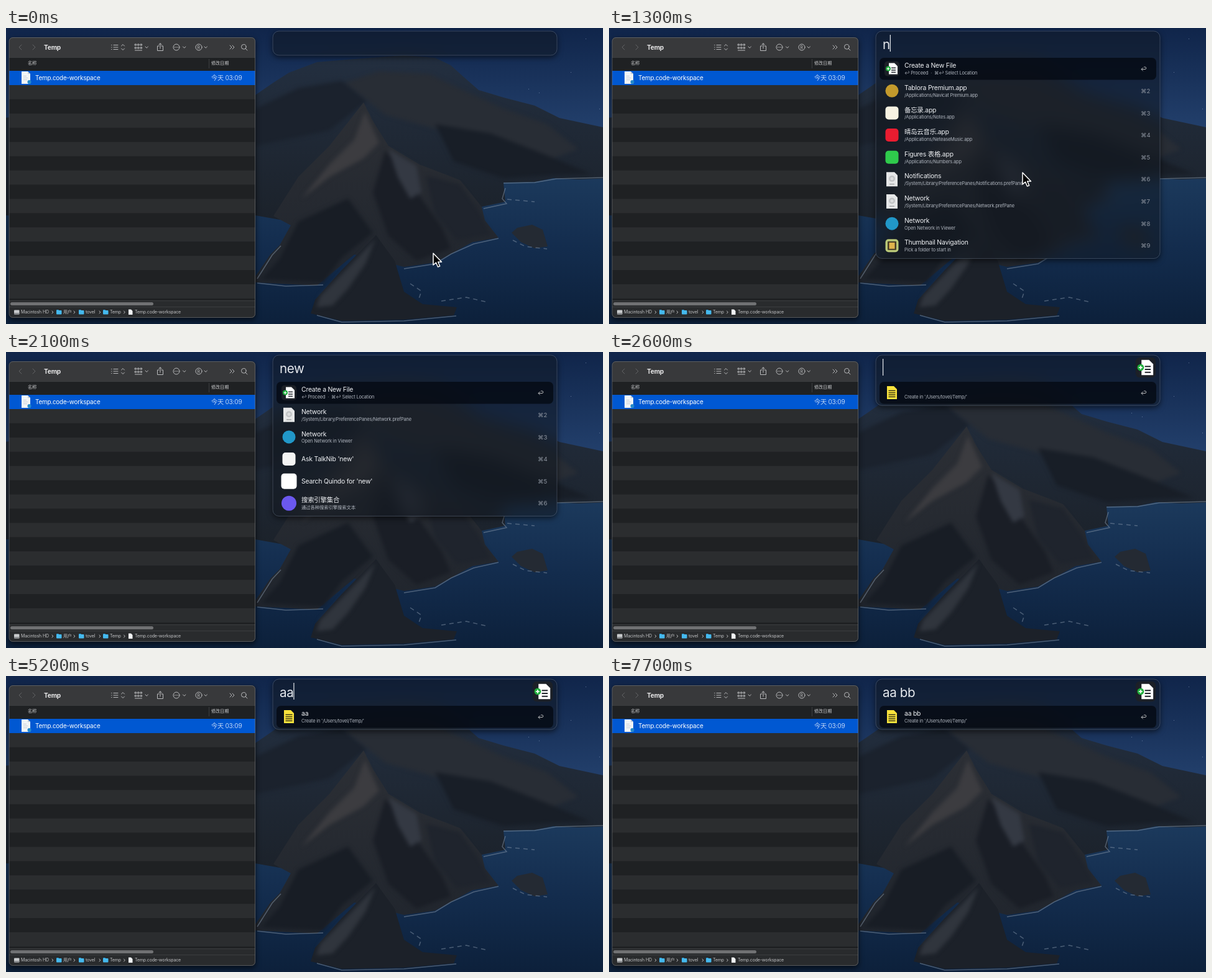
These frames come from a looping animation (960 by 477 pixels, 8000 ms). An HTML page:

```html
<!DOCTYPE html>
<html lang="zh">
<head>
<meta charset="utf-8">
<title>Create a New File</title>
<style>
  html, body { margin: 0; height: 100%; overflow: hidden; background: #0d1d38; }
  svg { display: block; width: 100vw; height: 100vh; }
  text { font-family: Inter, "Noto Sans CJK SC", "Noto Sans CJK", "DejaVu Sans", sans-serif; letter-spacing: -.02em; white-space: pre; }
  .line { fill: none; stroke: #b9babc; stroke-linecap: round; stroke-linejoin: round; }
  .soft { filter: blur(3px); }
  #finder { filter: drop-shadow(0 3px 5px #000a); }
  #panel { filter: drop-shadow(0 3px 5px #0009); }
</style>
</head>
<body>
<svg viewBox="0 0 960 477">
  <defs>
    <linearGradient id="sky" gradientUnits="userSpaceOnUse" x2="0" y2="160">
      <stop offset="0" stop-color="#10254a"/><stop offset="1" stop-color="#223f6b"/>
    </linearGradient>
    <linearGradient id="sea" x2="0" y2="1">
      <stop offset="0" stop-color="#1c3a5d"/><stop offset=".4" stop-color="#132c4d"/><stop offset="1" stop-color="#091a31"/>
    </linearGradient>
    <linearGradient id="hill" x2="0" y2="1">
      <stop offset="0" stop-color="#232f40"/><stop offset="1" stop-color="#1b2129"/>
    </linearGradient>
    <linearGradient id="crest" x2="0" y2="1">
      <stop offset="0" stop-color="#2c2f35"/><stop offset="1" stop-color="#20252d"/>
    </linearGradient>
    <clipPath id="panelClip"><rect id="panelShape" x="429" y="5" width="457" rx="10"/></clipPath>
    <clipPath id="finderClip"><rect x="5" y="15" width="396" height="452" rx="6"/></clipPath>
  </defs>

  <g id="wall">
    <path fill="url(#sky)" d="M-60-60H1020V250H-60Z"/>
    <path fill="url(#sea)" d="M-60 235H1020V540H-60Z"/>
    <path fill="#8fa5c4" opacity=".6" d="M857 104h1v1h-1zM908 71h1v1h-1zM932 17h1v1h-1zM840 98h1v1h-1zM954 130h1v1h-1z"/>
    <path fill="url(#hill)" d="M-60 150 401 108 430 88 455 72 500 55 560 50 640 44 690 48 715 60 735 78 760 100 800 112 850 125 890 145 960 160H1020V240L920 244 880 242 850 248 800 249 803 280 765 288 560 330 401 302H-60Z"/>
    <g class="soft">
      <path fill="#1b222d" d="M401 130 470 97 540 85 580 118 520 165 450 180 401 190Z"/>
      <path fill="#282d35" d="M545 88 600 70 680 74 735 100 800 130 870 155 920 195 880 210 800 200 700 165 610 140Z"/>
      <path fill="#181e27" d="M690 155 780 170 870 205 940 235 880 237 800 242 720 215Z"/>
    </g>
    <path fill="url(#crest)" d="M575 120 590 150 615 190 665 220 730 245 765 288 770 310 792 338 750 345 690 378 640 385 560 365 500 415 401 410 401 400 425 365 440 350 458 318 430 303 470 240 520 190Z"/>
    <g class="soft">
      <path fill="#3c3c40" d="M577 135 600 185 575 210 520 240 475 275 520 220 560 180Z"/>
      <path fill="#1a1e26" d="M610 197 650 250 700 320 715 355 660 375 615 335 590 265Z"/>
      <path fill="#343943" d="M615 195 660 222 668 265 650 275 630 240Z"/>
      <path fill="#1f242d" d="M675 238 730 252 758 292 780 333 725 342 690 300Z"/>
      <path fill="#181d25" d="M470 312 550 275 590 330 540 370 510 410 410 405 440 372Z"/>
    </g>
    <path fill="#1c2129" d="M595 334 625 375 640 425 670 445 725 450 720 463 640 470 540 472 490 460 497 438 540 390Z"/>
    <path class="soft" fill="#30353d" d="M594 340 578 380 550 420 525 447 499 450 505 432 548 388Z"/>
    <path fill="#242a33" d="M813 330 822 322 846 317 863 325 871 352 850 355 828 345Z"/>
    <g fill="none" stroke="#8797aa" stroke-width="1.5" opacity=".5">
      <path d="M800 250 850 249 885 243 960 241M803 258 798 275 805 283 768 291M792 339 752 348 716 364 690 380 640 388M500 463 540 474 640 472 724 464M404 404 428 366 442 351M404 411 450 416 510 414"/>
      <path stroke-dasharray="7 6" d="M815 342 835 352 870 356M700 440 740 434 775 442M650 412 668 424 664 436M806 276 850 280"/>
    </g>
  </g>

  <g id="finder">
    <g clip-path="url(#finderClip)">
      <path fill="#1f2123" d="M5 15H401V467H5Z"/>
      <path fill="#38393b" d="M5 15H401V47H5Z"/>
      <g id="stripes"></g>
      <path fill="#0058d2" d="M5 69H401V92H5Z"/>
      <path fill="#3c3e40" d="M5 47H401v1H5ZM326 50h1V65h-1ZM5 439H401v1H5ZM5 449H401v1H5Z"/>
      <path fill="#292b2d" d="M5 440H401V449H5ZM5 450H401V467H5Z"/>
      <rect x="7" y="442" width="230" height="5" rx="2.5" fill="#707173"/>
      <g class="line">
        <path stroke="#626365" d="M25 27 21 31 25 35M43 27 47 31 43 35"/>
        <path d="M173 27.5h7M173 31h7M173 34.5h7M169.5 27.5h.5M169.5 31h.5M169.5 34.5h.5M185.5 29 188 26.5 190.5 29M185.5 33 188 35.5 190.5 33"/>
        <path d="M207.5 26h2v2h-2zM212 26h2v2h-2zM216.5 26h2v2h-2zM207.5 31h2v2h-2zM212 31h2v2h-2zM216.5 31h2v2h-2zM207.5 36h11"/>
        <path d="M224 30l2.2 2.2L228.4 30M284.5 30l2.2 2.2L288.9 30M319 30l2.2 2.2L323.4 30"/>
        <path d="M246 29h-2.5v7.5h9V29H250M248 33V25M245.7 27 248 24.7 250.3 27"/>
        <path d="M360 28l3 3-3 3M364 28l3 3-3 3M385.3 33.3 388 36"/>
        <circle cx="274" cy="31" r="5"/><path stroke-width="1.5" d="M271.5 31h0M274 31h0M276.5 31h0"/>
        <circle cx="310" cy="31" r="5"/><circle cx="382.3" cy="30.3" r="3.8"/>
      </g>
      <path fill="#f2f4f6" d="M25 70h10l4 4V90H25Z"/>
      <path fill="#c5cdd6" d="M35 70v4h4ZM28 77h5v1h-5zM28 80h7v1h-7zM28 83h6v1h-6z"/>
      <circle cx="37.5" cy="87" r="3" fill="#2489ca"/>
      <g id="finderText"></g>
    </g>
    <rect x="5" y="15.5" width="395.5" height="451" rx="6" fill="none" stroke="#77797c" stroke-opacity=".6"/>
  </g>

  <g id="panel">
    <g clip-path="url(#panelClip)">
      <use href="#wall" style="filter:blur(14px)"/>
      <path fill="#10161f" fill-opacity=".5" d="M429 5H886V380H429Z"/>
    </g>
    <rect id="panelEdge" x="429" y="5" width="457" rx="10" fill="none" stroke="#8492a8" stroke-opacity=".35"/>
  </g>
  <g id="rows"></g>
  <text id="query" x="440" y="33.5" font-size="20.6" fill="#e6e9ee"></text>
  <rect id="caret" y="11" width="1.2" height="27" fill="#e6e9ee"/>
  <path id="mouse" d="M0 0V19L4.5 15 7.5 22 10.7 20.7 7.7 14H13.5Z" stroke="#fff" stroke-width="1.5" stroke-linejoin="round"/>
</svg>

<script>
const $ = id => document.getElementById(id);
const label = (x, y, text, size, fill, extra = '') =>
  `<text x="${x}" y="${y}" font-size="${size}" fill="${fill}" ${extra}>${text}</text>`;
const box = (x, y, w, h, fill, rx = 0) =>
  `<rect x="${x}" y="${y}" width="${w}" height="${h}" rx="${rx}" fill="${fill}"/>`;
const dot = (x, y, r, fill) => `<circle cx="${x}" cy="${y}" r="${r}" fill="${fill}"/>`;

// Finder window
const folder = x => box(x, 454, 4, 3, '#2f9fd8', 1) + box(x, 455, 8.5, 6.5, '#45b9ee', 1);
const pathText = (x, text) => label(x, 460.3, text, 7, '#c3c4c6');
const chevron = x => `<path class="line" d="M${x} 456l1.8 2-1.8 2"/>`;
for (let i = 0; i < 8; i++) $('stripes').innerHTML += box(5, 92 + i * 45.85, 396, 22.9, '#2b2d2f');
$('finderText').innerHTML =
  label(61, 34.6, 'Temp', 10.2, '#e8e8e9', 'font-weight="700"') +
  label(307.6, 33.6, 'R', 7, '#b9babc') +
  label(35, 59, '名称', 7.2, '#c9cacc') + label(330, 59, '修改日期', 7.2, '#c9cacc') +
  label(47, 83.5, 'Temp.code-workspace', 9.9, '#fff') +
  label(330, 83.5, '今天 03:09', 10.1, '#bfd5f6') +
  box(13, 454.5, 8.5, 7, '#c9cbcd', 1) + box(13, 459, 8.5, 2.5, '#8d9093', 1) +
  pathText(24, 'Macintosh HD') + folder(81) + pathText(92, '用户') + folder(117) +
  pathText(128, 'tovel') + folder(156) + pathText(167, 'Temp') +
  '<path fill="#f2f4f6" d="M197 453.5h4l2.5 2.5v6h-6.5Z"/>' + pathText(207, 'Temp.code-workspace') +
  [74, 109, 150, 189.5].map(chevron).join('');

// Row icons, drawn around the origin
const page = (w, h, fill) => `<path fill="${fill}" d="M${-w} ${-h}H${w - 5}L${w} ${5 - h}V${h}H${-w}Z"/>`;
const tile = fill => box(-10.5, -10.5, 21, 21, fill, 5);
const bars = (x, w, fill, ys) => ys.map(y => box(x, y, w, 1.5, fill)).join('');
const plusPage = box(-12, -12, 24, 24, '#1c2027', 5) +
  `<g transform="translate(2)">${page(7, 9, '#fff')}${bars(-3, 7, '#20242b', [-2, 1.5, 5])}</g>` +
  dot(-6, 0, 4, '#1fae3c') + box(-8.2, -.6, 4.4, 1.2, '#fff') + box(-6.6, -2.2, 1.2, 4.4, '#fff');
const note = page(8, 10.5, '#f8e23c') + bars(-5.5, 11, '#3a3715', [-4, -.7, 2.6, 5.9]);
const pane = page(9, 11.5, '#e6e7e8') + dot(0, -1, 5, '#c2c4c6') + dot(0, -1, 2.5, '#dcddde') + box(-4, 7, 8, 1.5, '#a4a6a8');
const globe = dot(0, 0, 10.5, '#2197c8');
const frames = tile('#b9c877') + box(-7, -7, 14, 14, '#463c26', 1) + box(-4.5, -5, 9, 10, '#e0b44c');

const create = [plusPage, 'Create a New File', '↩ Proceed  ·  ⌘↩ Select Location'];
const networkPane = [pane, 'Network', '/System/Library/PreferencePanes/Network.prefPane'];
const network = [globe, 'Network', 'Open Network in Viewer'];

function results(mode, query) {
  if (mode === 'action') return [[note, query, "Create in '/Users/tovel/Temp/'"]];
  if (!query) return [];
  if (query === 'n') return [
    create,
    [dot(0, 0, 10.5, '#c39a2c'), 'Tablora Premium.app', '/Applications/Navicat Premium.app'],
    [tile('#f6f2e2'), '备忘录.app', '/Applications/Notes.app'],
    [tile('#e91c30'), '晴岛云音乐.app', '/Applications/NeteaseMusic.app'],
    [tile('#2fca4c'), 'Figures 表格.app', '/Applications/Numbers.app'],
    [pane, 'Notifications', '/System/Library/PreferencePanes/Notifications.prefPane'],
    networkPane,
    network,
    [frames, 'Thumbnail Navigation', 'Pick a folder to start in'],
  ];
  return [
    create, networkPane, network,
    [tile('#f4f4f4'), `Ask TalkNib '${query}'`],
    [box(-12.5, -12.5, 25, 25, '#fff', 5), `Search Quindo for '${query}'`],
    [dot(0, 0, 12, '#6b58ee'), '搜索引擎集合', '通过各种搜索引擎搜索文本'],
  ];
}

const returnArrow = '<path class="line" stroke="#e6e9ee" d="M858.5 64 856 66.5 858.5 69M856.5 66.5H862a1.8 1.8 0 0 0 0-3.6H860.5"/>';

function row([icon, title, sub], i) {
  const y = 65.6 + i * 35.65;
  return `<g transform="translate(455 ${y})">${icon}</g>` +
    label(475, sub ? y - 1.4 : y + 3.9, title, 10.4, '#f0f2f5') +
    (sub ? label(475, y + 9.4, sub, 7.4, '#b0b6bf') : '') +
    (i ? label(855, y + 3.6, '⌘' + (i + 1), 9.6, '#8d949f') : returnArrow);
}

function showPanel(mode, query) {
  const list = results(mode, query);
  const height = list.length ? 45.6 + list.length * 35.65 : 39;
  for (const id of ['panelShape', 'panelEdge']) $(id).setAttribute('height', height);
  $('rows').innerHTML =
    (list.length ? box(435, 48, 445, 35.5, '#050a13c7', 7) : '') +
    (mode === 'action' ? `<g transform="translate(863 25) scale(1.35)">${plusPage}</g>` : '') +
    list.map(row).join('');
  $('query').textContent = query;
  $('caret').setAttribute('x', 440 + (query ? $('query').getComputedTextLength() : 0));
}

// Each key press restarts the caret blink
const keys = [
  [200, 'search', ''], [1300, 'search', 'n'], [1500, 'search', 'ne'], [1600, 'search', 'new'],
  [2600, 'action', ''], [4400, 'action', 'a'], [4900, 'action', 'aa'], [5500, 'action', 'aa '],
  [6000, 'action', 'aa b'], [6200, 'action', 'aa bb'],
];
let shown;

function draw() {
  const t = performance.now() % 8000;
  const key = keys.findLast(k => k[0] <= t) || keys[0];
  if (key !== shown) showPanel(key[1], key[2]);
  shown = key;
  const caretOn = t >= key[0] && (t - key[0]) % 1000 < 500;
  $('caret').setAttribute('visibility', caretOn ? 'visible' : 'hidden');

  const p = Math.min(1, t / 400), ease = p * p * (3 - 2 * p);
  $('mouse').setAttribute('transform', `translate(${687 - 22 * ease} ${363 - 130 * ease})`);
  $('mouse').setAttribute('visibility', t < 1400 ? 'visible' : 'hidden');
  requestAnimationFrame(draw);
}
draw();
</script>
</body>
</html>
```
